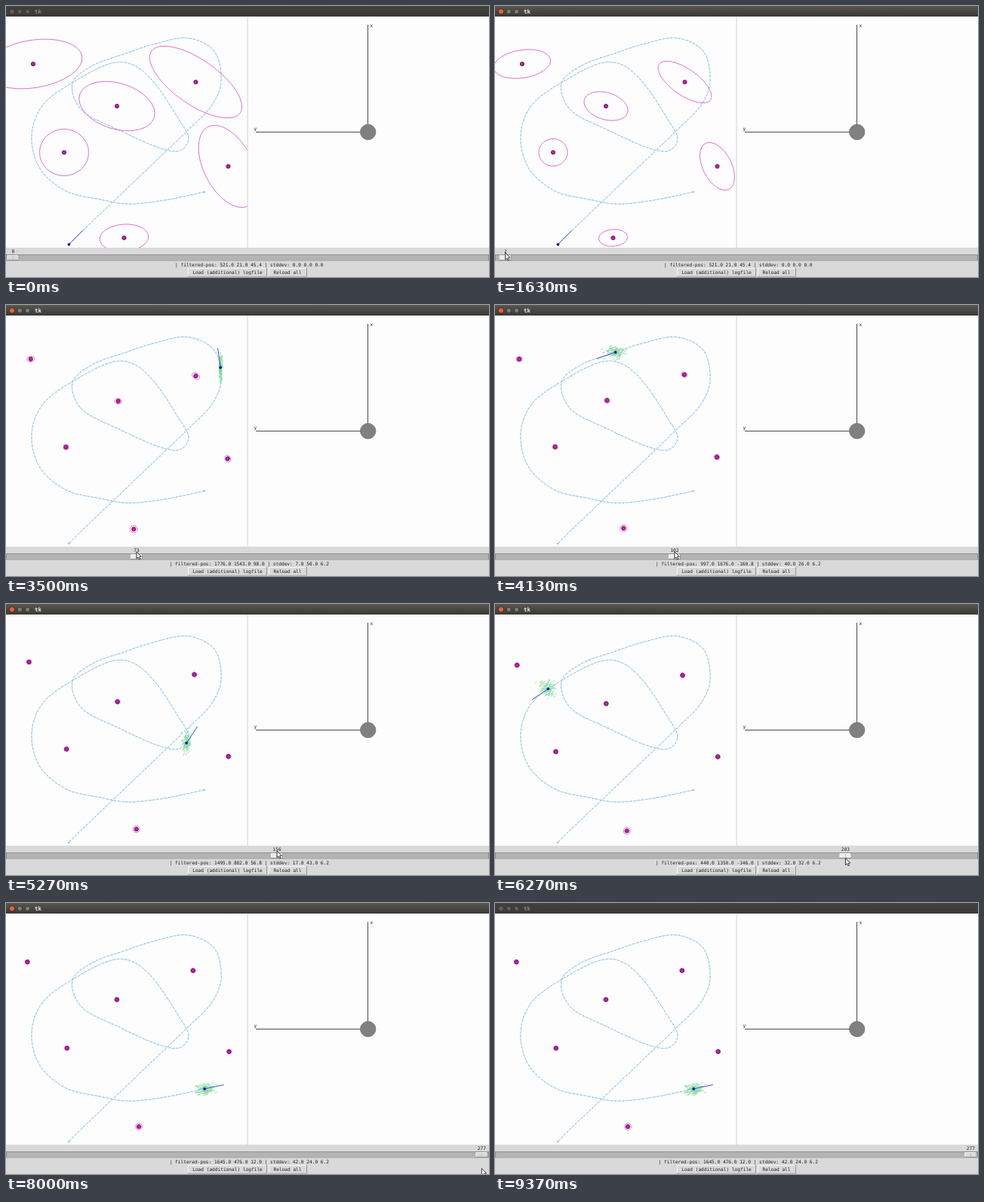
Animation of 640x360 px, one loop 9.41 s. Source, as an HTML page with a canvas:

```html
<!DOCTYPE html>
<html lang="en">
<head>
<meta charset="utf-8">
<title>tk</title>
<style>
  html, body { margin: 0; width: 100%; height: 100%; overflow: hidden; background: #d9d9d9; }
  canvas { display: block; }
</style>
</head>
<body>
<canvas id="stage" width="640" height="360"></canvas>
<script>
const ctx = document.getElementById('stage').getContext('2d');
const LOOP = 9410, LAST = 277, TAU = Math.PI * 2, DEG = Math.PI / 180;
const SCALE_X = 0.16, SCALE_Y = 0.1535;        // pixels per millimetre
const DEPART = 11.5, ARRIVE = 271.4;           // steps between which the robot drives
const PANEL = '#d9d9d9', PAPER = '#fdfdfd', INK = '#1c1c1c';

// Key points of the robot's route
const route = [
  [83.36, 316.78], [101, 299.1], [144, 258], [198.4, 206], [240, 166], [272, 133],
  [285, 100], [276, 60], [240, 42.5], [195, 51], [159, 62.9], [115, 79], [88, 103],
  [101, 139], [150, 165], [199, 187], [228.6, 192.6], [242, 176], [228, 149],
  [198, 104], [170, 79], [140, 76], [96, 97], [50, 130], [34, 172], [45, 216],
  [80, 246], [125, 257], [162, 263], [210, 258], [263.2, 246.93]
];

const landmarks = [
  { first: [36, 77], settled: [31, 76], radii: [65.6, 31.7], tilt: -9, floor: 3.1 },
  { first: [251.5, 101], settled: [250, 94], radii: [71.7, 29.8], tilt: 35, floor: 3.1 },
  { first: [147, 133], settled: [148, 129.5], radii: [51.6, 30.5], tilt: 17, floor: 3.1 },
  { first: [77, 194.5], settled: [80, 192], radii: [32.5, 31], tilt: 0, floor: 3.1 },
  { first: [294.5, 213], settled: [294.5, 203], radii: [59, 32.5], tilt: 63, floor: 3.1 },
  { first: [156.5, 308], settled: [172, 299], radii: [32.3, 18], tilt: -4, floor: 4.4 }
];

const clamp = (v, low, high) => Math.min(high, Math.max(low, v));
const ramp = (v, from, to) => clamp((v - from) / (to - from), 0, 1);
const smooth = (v, from, to) => { const u = ramp(v, from, to); return u * u * (3 - 2 * u); };
const mix = (a, b, u) => a + (b - a) * u;

function spline([p0, p1, p2, p3], t) {
  return 0.5 * (2 * p1 + (p2 - p0) * t + (2 * p0 - 5 * p1 + 4 * p2 - p3) * t * t
    + (3 * p1 - p0 - 3 * p2 + p3) * t * t * t);
}

// Sample the route with its running length.
const samples = [{ x: route[0][0], y: route[0][1], s: 0 }];
for (let i = 0; i < route.length - 1; i++) {
  const quad = [-1, 0, 1, 2].map(k => route[clamp(i + k, 0, route.length - 1)]);
  for (let k = 1; k <= 16; k++) {
    const x = spline(quad.map(p => p[0]), k / 16), y = spline(quad.map(p => p[1]), k / 16);
    const last = samples.at(-1);
    samples.push({ x, y, s: last.s + Math.hypot(x - last.x, y - last.y) });
  }
}
const total = samples.at(-1).s;

function pointAt(s) {
  const i = Math.max(1, samples.findIndex(p => p.s >= s));
  const a = samples[i - 1], b = samples[i], u = (s - a.s) / (b.s - a.s);
  return [mix(a.x, b.x, u), mix(a.y, b.y, u)];
}

// The robot drives at constant speed and looks along its route.
const poses = Array.from({ length: LAST + 1 }, (_, n) => {
  const s = total * ramp(n, DEPART, ARRIVE);
  const [x, y] = pointAt(s);
  const [x0, y0] = pointAt(Math.max(0, s - 2)), [x1, y1] = pointAt(Math.min(total, s + 2));
  const angle = Math.atan2(y0 - y1, x1 - x0), grown = ramp(n, 2, 14);
  const deviation = [6 + 38 * Math.cos(angle) ** 2, 23 + 28 * Math.sin(angle) ** 2, 6.2];
  return { x, y, angle, deviation: deviation.map(v => v * grown) };
});

function randomSource(seed) {
  let a = seed * 7919 + 17;
  return () => {
    a = a + 0x6D2B79F5 | 0;
    let t = Math.imul(a ^ a >>> 15, 1 | a);
    t = t + Math.imul(t ^ t >>> 7, 61 | t) ^ t;
    return ((t ^ t >>> 14) >>> 0) / 4294967296;
  };
}

function rect(x, y, w, h, fill) {
  ctx.fillStyle = fill;
  ctx.fillRect(x, y, w, h);
}

function line(x0, y0, x1, y1, color, width = 1) {
  ctx.strokeStyle = color;
  ctx.lineWidth = width;
  ctx.beginPath();
  ctx.moveTo(x0, y0);
  ctx.lineTo(x1, y1);
  ctx.stroke();
}

function disc(x, y, r, fill, stroke = fill, width = 0.8) {
  ctx.beginPath();
  ctx.arc(x, y, r, 0, TAU);
  ctx.fillStyle = fill;
  ctx.strokeStyle = stroke;
  ctx.lineWidth = width;
  ctx.fill();
  ctx.stroke();
}

function text(str, x, y, align = 'center', color = INK, font = '6.17px') {
  ctx.font = `${font} "DejaVu Sans Mono", monospace`;
  ctx.textAlign = align;
  ctx.fillStyle = color;
  ctx.fillText(str, x, y);
}

function bevel(x, y, w, h, fill) {
  rect(x, y, w, h, '#949494');
  rect(x, y, w - 1, h - 1, '#f6f6f6');
  rect(x + 1, y + 1, w - 2, h - 2, fill);
}

function drawTitle(focused) {
  const shade = ctx.createLinearGradient(0, 0, 0, 14);
  shade.addColorStop(0, focused ? '#585650' : '#42413e');
  shade.addColorStop(1, focused ? '#3a3935' : '#3a3936');
  rect(0, 0, 640, 14, shade);
  const idle = focused ? '#7d7b74' : '#5e5d58';
  disc(8, 7.3, 3.6, focused ? '#ec5f3c' : idle, '#2c2b28');
  disc(18.3, 7.3, 3.2, idle, '#2c2b28');
  disc(28.6, 7.3, 3.2, idle, '#2c2b28');
  text('tk', 38, 10, 'left', focused ? '#f0eee8' : '#8a8882', 'bold 7.5px');
}

function drawRoute() {
  ctx.strokeStyle = '#b4d9fa';
  ctx.lineWidth = 1;
  ctx.beginPath();
  for (const p of samples) ctx.lineTo(p.x, p.y);
  ctx.stroke();
  for (const p of poses) rect(p.x - 0.7, p.y - 0.7, 1.4, 1.4, '#90c0e6');
}

// The estimated map sways slightly as a whole while its ellipses shrink.
function drawLandmark({ first, settled, radii, tilt, floor }, n) {
  const known = smooth(n, 2, 40);
  const turn = 0.03 * Math.cos(Math.PI * n / LAST) * known;
  const lift = 2.5 * Math.cos(TAU * (n - 103) / 200) * known;
  const cx = mix(first[0], settled[0], known), cy = mix(first[1], settled[1], known);
  const x = cx - turn * (cy - 165), y = cy + turn * (cx - 165) - lift;
  const shrink = Math.sqrt(1 + n + n ** 3 / 2000);
  const [rx, ry] = radii.map(r => n ? Math.hypot(r / shrink, floor) : r);
  ctx.strokeStyle = '#d860d0';
  ctx.lineWidth = 0.9;
  ctx.beginPath();
  ctx.ellipse(x, y, rx, ry, tilt * DEG, 0, TAU);
  ctx.stroke();
  disc(x, y, 2.6, '#cc1cae', '#501050', 0.9);
}

function drawParticles({ x, y, angle, deviation }, n) {
  const random = randomSource(n);
  const gauss = () => Math.sqrt(-2 * Math.log(1 - random())) * Math.cos(TAU * random());
  ctx.strokeStyle = '#86d9a0';
  ctx.lineWidth = 0.8;
  ctx.beginPath();
  for (let i = 0; i < 110; i++) {
    const px = x + gauss() * deviation[0] * SCALE_X, py = y + gauss() * deviation[1] * SCALE_Y;
    const a = angle + gauss() * deviation[2] * DEG;
    const dx = Math.cos(a) * 1.8, dy = -Math.sin(a) * 1.8;
    ctx.moveTo(px - dx, py - dy);
    ctx.lineTo(px + dx, py + dy);
  }
  ctx.stroke();
}

function drawMap(n) {
  const pose = poses[n];
  ctx.save();
  ctx.beginPath();
  ctx.rect(0, 14, 320, 307);
  ctx.clip();
  drawRoute();
  if (n > 2) drawParticles(pose, n);
  for (const mark of landmarks) drawLandmark(mark, n);
  line(pose.x, pose.y, pose.x + 26 * Math.cos(pose.angle), pose.y - 26 * Math.sin(pose.angle), '#4450d0');
  disc(pose.x, pose.y, 1.5, '#1010b0');
  ctx.restore();
}

function drawAxes() {
  line(479.5, 25, 479.5, 167, '#4c4c4c');
  line(331, 167.5, 480, 167.5, '#4c4c4c');
  text('x', 482.5, 27.5, 'left');
  text('y', 328.5, 165, 'left');
  disc(479.7, 167.5, 10.2, '#808080', '#707070');
}

const handleX = n => 9.3 + n * 621 / LAST;

function drawControls(n, active) {
  const { x, y, angle, deviation } = poses[n], handle = handleX(n);
  rect(0, 321, 640, 39, PANEL);
  text(n, handle, 328.3);
  rect(0, 330, 640, 8.5, '#8e8e8e');
  rect(1, 331, 638, 7, '#b3b3b3');
  bevel(handle - 8, 331, 16, 7, active ? '#ececec' : PANEL);
  line(handle, 332, handle, 337, '#b3b3b3', 0.8);

  const list = values => values.map(v => v.toFixed(1)).join(' ');
  const position = [Math.round(x / SCALE_X), Math.round((320 - y) / SCALE_Y), angle / DEG];
  const spread = [Math.round(deviation[0]), Math.round(deviation[1]), deviation[2]];
  text(`| filtered-pos: ${list(position)} | stddev: ${list(spread)}`, 322.3, 345.6);

  bevel(241, 348, 105, 11.5, PANEL);
  bevel(348, 348, 51, 11.5, PANEL);
  text('Load (additional) logfile', 293.5, 356);
  text('Reload all', 373, 356);
}

function drawPointer(x, y) {
  ctx.beginPath();
  for (const [dx, dy] of [[0, 0], [0, 8.8], [2, 7], [3.4, 10], [4.9, 9.3], [3.6, 6.4], [6.3, 6.2]]) {
    ctx.lineTo(x + dx, y + dy);
  }
  ctx.closePath();
  ctx.fillStyle = '#ffffff';
  ctx.strokeStyle = '#222222';
  ctx.lineWidth = 0.9;
  ctx.fill();
  ctx.stroke();
}

function draw(now) {
  const time = now % LOOP;
  // A slow first nudge of the slider, then a steady drag to its end
  const nudge = clamp((time - 1300) / 165, 0, 4), drag = (time - 1960) * 0.0472;
  const n = Math.round(Math.min(LAST, Math.max(nudge, drag)));

  rect(0, 14, 640, 307, PAPER);
  drawMap(n);
  rect(319.5, 14, 1.2, 307, PANEL);
  drawAxes();
  drawControls(n, time > 950 && time < 7900);
  drawTitle(time > 950 && time < 8700);

  const arrive = smooth(time, 350, 950), leave = smooth(time, 7800, 8250);
  const sink = 18 * smooth(time, 5300, 7130);
  if (arrive > 0 && leave < 1) {
    drawPointer(handleX(n) + 60 * (1 - arrive), 328 + 33 * (1 - arrive) + sink + 16 * leave);
  }
  requestAnimationFrame(draw);
}
requestAnimationFrame(draw);
</script>
</body>
</html>
```
